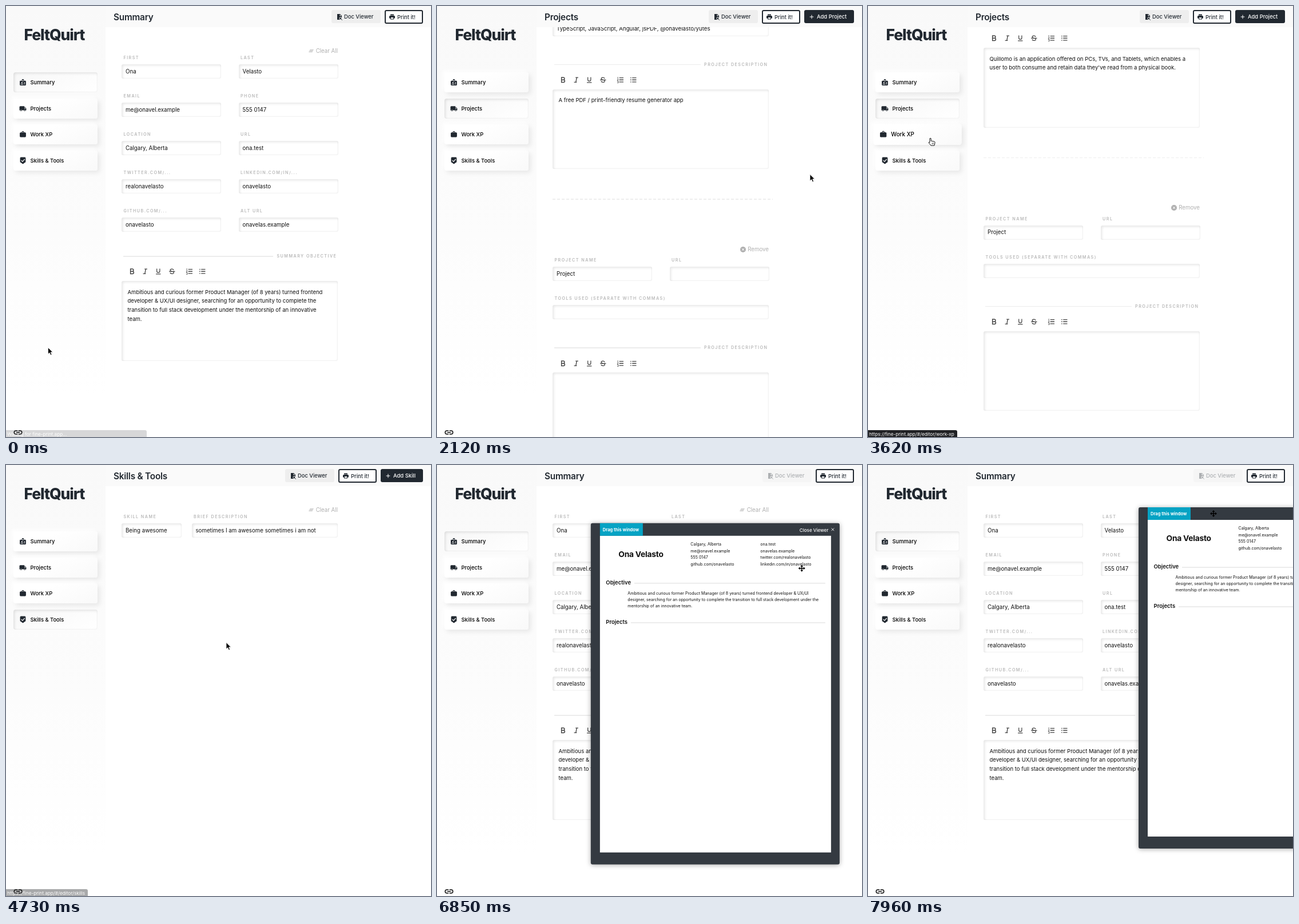
Recreate the animation shown at these times as an HTML page. Size 743x754 px, loop 8000 ms.

```html
<!DOCTYPE html>
<html lang="en">
<head>
<meta charset="utf-8">
<title>Resume editor</title>
<style>
html, body { margin: 0; width: 100%; height: 100%; overflow: hidden; background: #fff; }
#stage { position: relative; width: 743px; height: 754px; overflow: hidden; background: #fff;
  font-family: Inter, "Open Sans", sans-serif; color: #111; }
#stage div, #stage svg { position: absolute; box-sizing: border-box; }
.t { white-space: pre; line-height: 20px; height: 20px; font-size: 9.7px; }
.label { font-size: 7.2px; font-weight: 600; letter-spacing: 1.45px; color: #b9b9b9; }
.soft { color: #b0b0b0; }
.rich { font-size: 9.5px; }
.logo { font-size: 26.5px; font-weight: 800; letter-spacing: -1.1px; color: #212830; }
.title { font-size: 15.3px; font-weight: 600; letter-spacing: -.2px; color: #212830; }
.btn { font-size: 9.4px; font-weight: 500; }
.small { font-size: 7.05px; }
.tab { font-size: 7.5px; font-weight: 700; }
.close { font-size: 8px; font-weight: 500; }
.head { font-size: 9.5px; font-weight: 600; }
.name { font-size: 13.8px; font-weight: 700; letter-spacing: -.25px; }
.field { border-radius: 3px; background: #fff;
  box-shadow: inset 2px 2px 4px rgba(0,0,0,.1), inset -1px -1px 2px rgba(0,0,0,.05); }
.rule { height: 1.5px; background: #ececec; }
.dash { height: 1.5px; background: repeating-linear-gradient(90deg, #eee 0 5px, transparent 5px 8px); }
.nav { left: 13px; width: 147px; height: 35px; border-radius: 4px; color: #212830;
  background: linear-gradient(155deg, #fff 35%, #f9f9f9);
  box-shadow: 4px 4px 8px rgba(0,0,0,.08), -3px -3px 6px #fff; }
.nav.on { background: linear-gradient(155deg, #f7f7f7, #fff);
  box-shadow: inset 2px 2px 4px rgba(0,0,0,.1), inset -1px -1px 2px rgba(0,0,0,.04); }
.nav .t { color: #000; }
#sidebar { left: 0; top: 0; width: 174px; height: 754px; background: linear-gradient(#f9f9f9, #fcfcfc 400px, #fff 680px); }
#header { left: 174px; top: 0; width: 569px; height: 37px; background: #fafafa; }
#title { left: 14px; top: 9.5px; }
.hb { top: 7px; height: 23px; border-radius: 3px; color: #212830; }
#doc { width: 86px; background: #eee; }
#print { width: 67px; height: 24px; background: #fff; border: 2px solid #212830; }
#add { background: #212830; color: #fff; }
#addText { left: 22px; top: 1.5px; }
#status { left: 0; top: 742px; height: 13px; background: #202124; color: #fff; font-size: 8.2px;
  line-height: 15px; padding: 0 5px 0 2px; white-space: pre; border-radius: 0 3px 0 0; }
#viewer { left: 0; top: 0; width: 435px; height: 597px; background: #343a41; border-radius: 3px;
  box-shadow: 0 1px 9px rgba(0,0,0,.35); }
.paper { background: #fff; }
.handle { background: #05a3c4; }
.bar { color: #fff; }
.tools { color: #444; }
</style>
</head>
<body>
<div id="stage"></div>
<script>
const stroke = (d, w = 2, color = 'currentColor') =>
  `<path d="${d}" fill="none" stroke="${color}" stroke-width="${w}"/>`;
const fill = (d, color = 'currentColor') => `<path d="${d}" fill="${color}" fill-rule="evenodd"/>`;
const dot = (x, y, r, color = 'currentColor') => `<circle cx="${x}" cy="${y}" r="${r}" fill="${color}"/>`;

const ICONS = {
  badge: fill('M4 7h5V2h6v5h5a2 2 0 0 1 2 2v11a2 2 0 0 1-2 2H4a2 2 0 0 1-2-2V9a2 2 0 0 1 2-2zM11 4v5h2V4z') +
    dot(9, 13, 2, '#fff') + stroke('M5 18h8M15 13h4M15 17h4', 2, '#fff'),
  truck: fill('M3 4h14v4h3l3 4v5H1V6z') + dot(6, 17, 3) + dot(18, 17, 3) + dot(6, 17, 1.4, '#fff') +
    dot(18, 17, 1.4, '#fff') + fill('M17 9.5h2.5l2 2.5H17z', '#fff'),
  work: fill('M4 6h4V4l2-2h4l2 2v2h4l2 2v11l-2 2H4l-2-2V8zM10 4v2h4V4z'),
  shield: fill('M5 1h14l2 2v12l-1 2-8 6-8-6-1-2V3z') + stroke('M7 11l4 4 7-8', 2.2, '#fff'),
  doc: fill('M4 2h10l6 6v7l-4-3-5 3v4l3 3H4z') + fill('M13 3.5V9h5.5z', '#eee') +
    stroke('M17.5 19.5l4 4') + dot(15.5, 17.5, 3),
  print: fill('M6 3h12v4H6zM4 8h16l2 2v7h-4v4H6v-4H2v-7zM8 14v5h8v-5z'),
  plus: stroke('M12 4v16M4 12h16', 2.4),
  clear: stroke('M7 8h14M5 12h14M3 16h14'),
  remove: dot(12, 12, 10) + stroke('M8 8l8 8M16 8l-8 8', 2, '#fff'),
  link: stroke('M11 8H7a4 4 0 0 0 0 8h4M13 8h4a4 4 0 0 1 0 8h-4M8 12h8'),
  cross: stroke('M5 5l14 14M19 5L5 19', 2.6),
  bold: stroke('M7 4h6a4 4 0 0 1 0 8H7zM7 12h7a4 4 0 0 1 0 8H7z', 2.8),
  italic: stroke('M10 4h9M5 20h9M11 20l3-16', 2.6),
  under: stroke('M7 3v8a5 5 0 0 0 10 0V3M4 21h16', 2.4),
  strike: stroke('M17 8c0-6-11-5-11 0 0 5 12 3 12 8 0 6-12 5-12 0M2 12h20', 2.4),
  ol: stroke('M9 5h14M9 12h14M9 19h14', 2.6) + stroke('M4 2v6M2 10h4l-4 5h4M2 17h4v5H2', 1.5),
  ul: stroke('M8 5h14M8 12h14M8 19h14M2 5h3M2 12h3M2 19h3', 2.6)
};
const POINTERS = {
  arrow: '<path d="M0 0v11.5l2.7-2.4 1.8 4.1 2-.9-1.8-4h3.6z" stroke="#fff" stroke-width=".8"/>',
  hand: '<path d="M-2 5V-.2q1.1-1.2 2.2 0V4l6 1.2q1 .4.9 1.5L6 12H0l-4-5q.4-1.5 2-.4z" fill="#fff" stroke="#111"/>' +
    '<path d="M2.3 7v3M4.3 7v3" stroke="#111" stroke-width=".7"/>',
  move: '<path d="M-5 0H5M0-5V5" stroke="#000" stroke-width="1.5"/>' +
    '<path d="M-6 0l3-2.5v5zM6 0l-3-2.5v5zM0-6l-2.5 3h5zM0 6l-2.5-3h5z"/>'
};

const icon = (name, cx, cy, size = 13, cls = '') =>
  `<svg class="${cls}" style="left:${cx - size / 2}px;top:${cy - size / 2}px" width="${size}" height="${size}" viewBox="0 0 24 24">${ICONS[name]}</svg>`;
const text = (x, cy, str, cls = '') => `<div class="t ${cls}" style="left:${x}px;top:${cy - 10}px">${str}</div>`;
const textEnd = (right, cy, str, cls = '') =>
  `<div class="t ${cls}" style="right:${743 - right}px;top:${cy - 10}px">${str}</div>`;
const box = (cls, x, y, w, h) =>
  `<div class="${cls}" style="left:${x}px;top:${y}px;width:${w}px;${h ? `height:${h}px` : ''}"></div>`;
const block = (id, inner) => `<div id="${id}" style="left:0;top:0;width:743px;height:0">${inner}</div>`;

const field = (x, y, w, label, value = '') =>
  text(x + 3.5, y, label, 'label') + box('field', x, y + 11, w, 25) + text(x + 7, y + 23.5, value);
const pair = (y, a, b) => field(202, y, 174, ...a) + field(406.5, y, 174, ...b);
const lines = (x, y, step, rows, cls) => rows.map((row, i) => text(x, y + i * step, row, cls)).join('');
const clearAll = icon('clear', 533, 78, 11, 'soft') + textEnd(580, 78.5, 'Clear All', 'soft');
const TOOLS = { bold: 220, italic: 243, under: 266.5, strike: 290, ol: 320, ul: 343 };

const editor = (y, label, ruleEnd, rows) =>
  box('rule', 205, y - 1, ruleEnd - 205) + textEnd(578.4, y, label, 'label') +
  '<span class="tools">' + Object.entries(TOOLS).map(([n, x]) => icon(n, x, y + 26.5, 12.5)).join('') + '</span>' +
  box('field', 202, y + 43, 378, 139.5) + lines(212.5, y + 62.5, 15.7, rows, 'rich');

const entry = (id, first, fields, label, rows) => block(id,
  (first ? '' : box('dash', 202, -17, 385) + icon('remove', 535, 71.5, 12, 'soft') + textEnd(580, 71.5, 'Remove', 'soft')) +
  fields + editor(244, label, 461, rows));
const project = (id, first, name, url, tools, rows) => entry(id, first,
  pair(91, ['PROJECT NAME', name], ['URL', url]) +
  field(202, 158, 378, 'TOOLS USED (SEPARATE WITH COMMAS)', tools), 'PROJECT DESCRIPTION', rows);
const skill = (id, y, name, about) =>
  block(id, field(202, y, 105, 'SKILL NAME', name) + field(324.5, y, 255.5, 'BRIEF DESCRIPTION', about));

const PERSON = { first: 'Ona', last: 'Velasto', mail: 'me@onavel.example', phone: '555 0147',
  place: 'Calgary, Alberta', url: 'ona.test', handle: 'onavelasto', alt: 'onavelas.example' };

const summaryPage = clearAll +
  pair(91, ['FIRST', PERSON.first], ['LAST', PERSON.last]) +
  pair(158, ['EMAIL', PERSON.mail], ['PHONE', PERSON.phone]) +
  pair(225, ['LOCATION', PERSON.place], ['URL', PERSON.url]) +
  pair(292, ['TWITTER.COM/...', 'real' + PERSON.handle], ['LINKEDIN.COM/IN/...', PERSON.handle]) +
  pair(359, ['GITHUB.COM/...', PERSON.handle], ['ALT URL', PERSON.alt]) +
  editor(438, 'SUMMARY OBJECTIVE', 467, [
    'Ambitious and curious former Product Manager (of 8 years) turned frontend',
    'developer &amp; UX/UI designer, searching for an opportunity to complete the',
    'transition to full stack development under the mentorship of an innovative', 'team.']);

const projectsPage = clearAll +
  project('p0', true, 'Quillomo', '', 'TypeScript, Angular', [
    'Quillomo is an application offered on PCs, TVs, and Tablets, which enables a',
    "user to both consume and retain data they've read from a physical book."]) +
  project('p1', false, 'FeltQuirt', '', `TypeScript, JavaScript, Angular, jsPDF, @${PERSON.handle}/yutes`,
    ['A free PDF / print-friendly resume generator app']) +
  project('p2', false, 'Project', '', '', []);

const workPage = clearAll + entry('w0', true,
  pair(91, ['JOB TITLE', 'Product Manager'], ['COMPANY']) + pair(158, ['START DATE'], ['END DATE']),
  'JOB DESCRIPTION', []);
const skillsPage = clearAll + skill('s0', 91, 'Being awesome', 'sometimes I am awesome sometimes i am not') +
  skill('s1', 158, 'Skill', '');

const heading = (y, str, w) => text(26.5, y, str, 'head') + box('rule', 26.5 + w, y + .5, 383 - w);
const viewer = box('paper', 16, 21.5, 404, 554.5) + box('handle', 16, 0, 75, 21.5) +
  '<span class="bar">' + text(21, 11.5, 'Drag this window', 'tab') +
  text(365, 11.5, 'Close Viewer', 'close') + icon('cross', 423, 11, 8) + '</span>' +
  text(48.5, 54, `${PERSON.first} ${PERSON.last}`, 'name') +
  lines(174.5, 37, 11.5, [PERSON.place, PERSON.mail, PERSON.phone, 'github.com/' + PERSON.handle], 'small') +
  lines(296.5, 37, 11.5, [PERSON.url, PERSON.alt, 'twitter.com/real' + PERSON.handle, 'linkedin.com/in/' + PERSON.handle], 'small') +
  heading(103.5, 'Objective', 49) +
  lines(64.5, 123, 10.8, [
    'Ambitious and curious former Product Manager (of 8 years) turned frontend developer &amp; UX/UI',
    'designer, searching for an opportunity to complete the transition to full stack development under the',
    'mentorship of an innovative team.'], 'small') +
  heading(172.5, 'Projects', 43);

const NAV = [['Summary', 'badge'], ['Projects', 'truck'], ['Work XP', 'work'], ['Skills &amp; Tools', 'shield']];
const ADD = [['', 736], ['Add Project', 642], ['Add Work', 651], ['Add Skill', 655]];
const SLUGS = ['summary', 'projects', 'work-xp', 'skills'];

document.getElementById('stage').innerHTML =
  [summaryPage, projectsPage, workPage, skillsPage].map((p, i) => block('page' + i, p)).join('') +
  `<div id="sidebar">${text(31.5, 50, 'FeltQuirt', 'logo')}` +
  NAV.map(([name, ic], i) => `<div class="nav" id="nav${i}" style="top:${116 + 45.5 * i}px">` +
    icon(ic, 16.5, 17.5, 13) + text(29.5, 18, name, 'btn') + '</div>').join('') + '</div>' +
  `<div id="header"><div id="title" class="t title"></div></div>
  <div id="doc" class="hb">${icon('doc', 14, 11.5, 12) + text(22, 11.5, 'Doc Viewer', 'btn')}</div>
  <div id="print" class="hb">${icon('print', 11, 10, 12) + text(20, 10.5, 'Print it!', 'btn')}</div>
  <div id="add" class="hb">${icon('plus', 13, 11.5, 10)}<div id="addText" class="t btn"></div></div>` +
  icon('link', 21, 746, 18) + `<div id="viewer">${viewer}</div><div id="status"></div>` +
  '<svg id="pointer" style="left:0;top:0" width="743" height="754"><g></g></svg>';

const $ = id => document.getElementById(id);
const show = (id, on) => { $(id).style.display = on ? 'block' : 'none'; };
const pointer = document.querySelector('#pointer g');

const LOOP = 8000, PITCH = 495.5;
const PAGE_STARTS = [[0, 0], [560, 1], [3720, 2], [4480, 3], [5780, 0]];
const HOVERS = [[1, 360, 600], ['add', 1540, 1760], [2, 3440, 3740], [3, 4380, 4602], ['add', 5040, 5260], [0, 5600, 5850]];
const POINTER_PATH = [[40, 73.5, 597.5], [440, 100, 185], [560, 114, 185], [840, 114, 185], [1120, 400, 300],
  [1270, 400, 300], [1590, 688, 18], [1740, 688, 18], [2040, 652, 294.5], [2420, 652, 294.5], [2460, 557, 465],
  [2620, 557, 465], [2930, 556, 353], [3060, 556, 353], [3460, 110, 232], [3740, 110, 232], [3960, 570, 478],
  [4119, 570, 478], [4120, 235, 355], [4300, 235, 355], [4420, 95, 272], [4500, 95, 272], [4730, 385, 310.5],
  [5080, 692, 18], [5260, 692, 18], [5640, 80, 134], [5850, 80, 134], [6360, 612, 18], [6450, 612, 18], [6610, 639, 181]];
const SCROLL = [[850, 0], [1120, 214], [1720, 214], [2120, 635.5], [2190, 709.5], [2620, 709.5], [2930, 214]];
const WINDOW = [[6850, 270, 102], [7060, 32, 62], [7250, 160, 330], [7420, 329, 468], [7560, 440, 420], [7680, 458, 250], [7960, 473, 74]];
const GRIP = [[6850, 369, 79], [7420, 269, 45], [7960, 131, 11]];

const clamp = v => Math.max(0, Math.min(1, v));
const smooth = k => k * k * (3 - 2 * k);
function along(keys, t, ease = k => k) {
  const i = keys.findIndex(key => key[0] > t);
  if (i === 0) return keys[0].slice(1);
  if (i < 0) return keys[keys.length - 1].slice(1);
  const a = keys[i - 1], b = keys[i], k = ease((t - a[0]) / (b[0] - a[0]));
  return a.slice(1).map((v, j) => v + (b[j + 1] - v) * k);
}
const hoverAmount = (id, t) => Math.max(0, ...HOVERS.filter(h => h[0] === id)
  .map(([, from, to]) => Math.min(clamp((t - from) / 120), clamp(1 - (t - to) / 120))));

function drawStatus(t) {
  const hover = HOVERS.find(([id, from, to]) => id !== 'add' && t >= from && t < to + 210);
  const waiting = t < 200;
  const end = waiting ? -173 : hover ? hover[2] : -LOOP;
  $('status').textContent = waiting ? 'Waiting for fine-print.app...' :
    hover ? 'https://fine-print.app/#/editor/' + SLUGS[hover[0]] : '';
  $('status').style.width = waiting ? '246px' : 'auto';
  $('status').style.opacity = clamp(1 - (t - end) / 210);
}

function drawPointer(t, windowPos) {
  let [x, y] = along(POINTER_PATH, t, smooth), kind = 'arrow';
  if (t >= 6610) {
    const grip = along(GRIP, t);
    [x, y] = [windowPos[0] + grip[0], windowPos[1] + grip[1]];
    kind = 'move';
  } else if ((x > 13 && x < 160 && y > 116 && y < 287) || (y < 31 && x > 475) || (t > 2900 && t < 3080)) {
    kind = 'hand';
  }
  pointer.innerHTML = POINTERS[kind];
  pointer.setAttribute('transform', `translate(${x} ${y})`);
}

function draw(t) {
  const page = PAGE_STARTS.filter(p => p[0] <= t).pop()[1];
  const [addLabel, addLeft] = ADD[page];
  for (let i = 0; i < 4; i++) {
    show('page' + i, i === page);
    $('nav' + i).classList.toggle('on', i === page);
    $('nav' + i).style.transform = `scale(${i === page ? 1 : 1 + .05 * hoverAmount(i, t)})`;
  }
  $('title').innerHTML = NAV[page][0];
  $('addText').textContent = addLabel;
  show('add', addLabel);
  $('add').style.left = addLeft + 'px';
  $('add').style.width = 729 - addLeft + 'px';
  $('add').style.transform = `scale(${1 + .04 * hoverAmount('add', t)})`;
  $('print').style.left = addLeft - 74 + 'px';
  $('doc').style.left = addLeft - 167 + 'px';

  const removed = t >= 3000;
  $('page1').style.top = -along(SCROLL, t)[0] + 'px';
  $('p1').style.top = PITCH + 'px';
  $('p2').style.top = PITCH * (removed ? 1 : 2) + 'px';
  show('p1', !removed);
  show('p2', t >= 1680);
  show('s1', t >= 5200);

  const open = t >= 6430, pos = along(WINDOW, t);
  show('viewer', open);
  $('viewer').style.transform = `translate(${pos[0]}px, ${pos[1]}px)`;
  $('doc').style.opacity = open ? .35 : 1;
  drawStatus(t);
  drawPointer(t, pos);
}

function tick() {
  draw(performance.now() % LOOP);
  requestAnimationFrame(tick);
}
tick();
</script>
</body>
</html>
```
